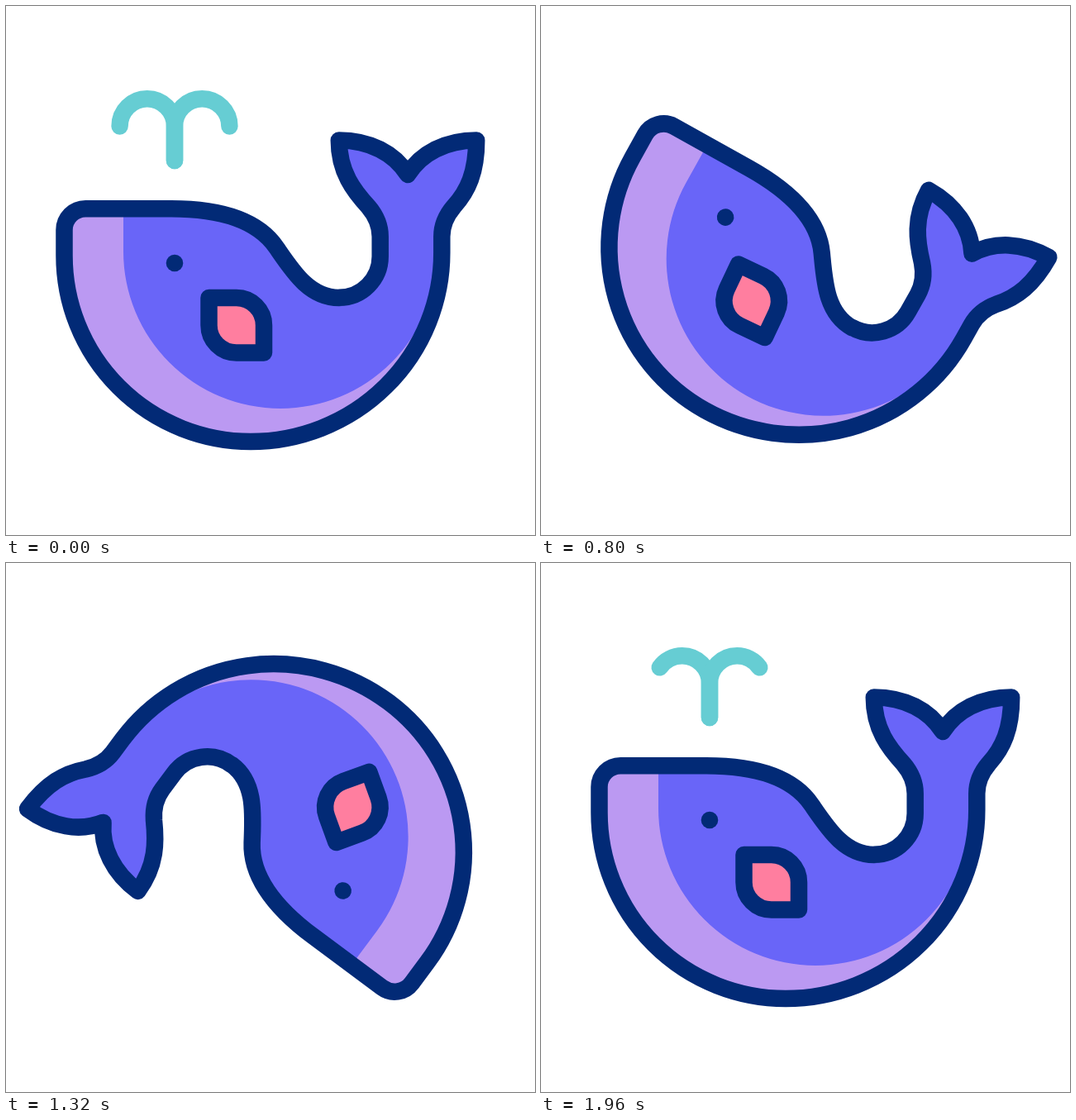
Write an HTML page with a canvas that moves like this. It is 640 px wide and 640 px high and loops after 2 s.

```html
<!DOCTYPE html>
<html lang="en">
<head>
<meta charset="utf-8">
<title>Whale</title>
<style>
  html, body { margin: 0; width: 100%; height: 100%; overflow: hidden; background: #fff; }
  canvas { display: block; width: 640px; height: 640px; }
</style>
</head>
<body>
<canvas id="stage" width="640" height="640"></canvas>
<script>
const ctx = document.getElementById('stage').getContext('2d');
const LOOP = 2000, STEP = 40, LINE = 20.5;
const NAVY = '#022a76', BLUE = '#6965f8', LILAC = '#bb99f2', PINK = '#ff7e9f', TEAL = '#66cdd3';
const { PI } = Math;

const body = makeBody();
const back = new Path2D();
back.rect(142, 0, 498, 297);
back.arc(332, 297, 190, 0, 2 * PI);
const fin = new Path2D();
fin.roundRect(245.5, 353, 66.5, 66.5, [0, 33.3, 0, 33.3]);

function makeBody() {
  const p = new Path2D();
  const left = 70.5, top = 245.3, belly = 296;
  const tail = 490, neck = 37.3, fork = 486, wing = 83.2, tip = 162.5;

  // Head, back and the hollow before the tail
  p.moveTo(left, 302);
  p.arcTo(left, top, 200, top, 25.7);
  p.lineTo(200, top);
  p.bezierCurveTo(262, top, 305, 260, 327, 292);
  p.bezierCurveTo(347, 321, 367, 353, 403, 353);
  p.arc(403, 303, 49.7, PI / 2, 0, true);

  // Tail: up the left side, across the fork, down the mirrored right side
  p.lineTo(tail - neck, 279);
  p.bezierCurveTo(tail - neck, 264, tail - 43, 253, tail - 51.5, 243);
  p.bezierCurveTo(tail - 69, 224, fork - wing, 201, fork - wing, tip);
  p.bezierCurveTo(fork - 46, tip, fork - 16, 178, fork, 204);
  p.bezierCurveTo(fork + 16, 178, fork + 46, tip, fork + wing, tip);
  p.bezierCurveTo(fork + wing, 201, tail + 69, 224, tail + 51.5, 243);
  p.bezierCurveTo(tail + 43, 253, tail + neck, 264, tail + neck, 279);

  p.ellipse(belly, 298.5, tail + neck - belly, 228.5, 0, 0, PI / 2);
  p.ellipse(belly, 302, belly - left, 225, 0, PI / 2, PI);
  p.closePath();
  return p;
}

const bez = (a, b, s) => 3 * a * s * (1 - s) ** 2 + 3 * b * s * s * (1 - s) + s ** 3;

// Eased progress from 0 to 1 between two times; a and b place the flat handles.
function span(t, from, to, a = 1 / 3, b = 2 / 3) {
  const x = Math.min(1, Math.max(0, (t - from) / (to - from)));
  let lo = 0, hi = 1;
  for (let i = 0; i < 30; i++) {
    const mid = (lo + hi) / 2;
    if (bez(a, b, mid) < x) lo = mid; else hi = mid;
  }
  return bez(0, 1, (lo + hi) / 2);
}

const spin = t => -31 * span(t, 0, 500) + 391 * span(t, 500, 1880, 0.235, 0.745);
const flap = t => -45 * span(t, 0, 500) + 84 * span(t, 500, 1200, 0.2, 0.63) - 39 * span(t, 1200, 1700);
const spout = t => 1 - span(t, 0, 170) + span(t, 1830, LOOP);

function turn(x, y, deg) {
  ctx.translate(x, y);
  ctx.rotate(deg * PI / 180);
  ctx.translate(-x, -y);
}

function drawSpout(part) {
  if (part < 0.001) return;
  const base = 187, top = 145.5, r = 33.2, stem = base - top;
  const len = part * (stem + PI * r);
  const bend = Math.max(0, len - stem) / r;
  ctx.strokeStyle = TEAL;
  for (const side of [-1, 1]) {
    ctx.save();
    ctx.translate(204, 0);
    ctx.scale(side, 1);
    ctx.beginPath();
    ctx.moveTo(0, base);
    ctx.lineTo(0, base - Math.min(len, stem));
    if (bend > 0) ctx.arc(r, top, r, PI, PI + bend);
    ctx.stroke();
    ctx.restore();
  }
}

function drawWhale(t) {
  ctx.save();
  turn(320, 320, spin(t));

  ctx.fillStyle = LILAC;
  ctx.fill(body);
  ctx.save();
  ctx.clip(body);
  ctx.fillStyle = BLUE;
  ctx.fill(back);
  ctx.restore();
  ctx.strokeStyle = ctx.fillStyle = NAVY;
  ctx.stroke(body);

  ctx.beginPath();
  ctx.arc(204, 311, 10.3, 0, 2 * PI);
  ctx.fill();

  turn(245.5, 353, flap(t));
  ctx.fillStyle = PINK;
  ctx.fill(fin);
  ctx.stroke(fin);
  ctx.restore();
}

function draw(t) {
  ctx.fillStyle = '#fff';
  ctx.fillRect(0, 0, 640, 640);
  ctx.lineWidth = LINE;
  ctx.lineCap = ctx.lineJoin = 'round';
  drawSpout(spout(t));
  drawWhale(t);
}

const start = performance.now();
function tick() {
  const t = (performance.now() - start) % LOOP;
  draw(Math.floor((t + 0.5) / STEP) * STEP % LOOP);
  requestAnimationFrame(tick);
}
tick();
</script>
</body>
</html>
```
